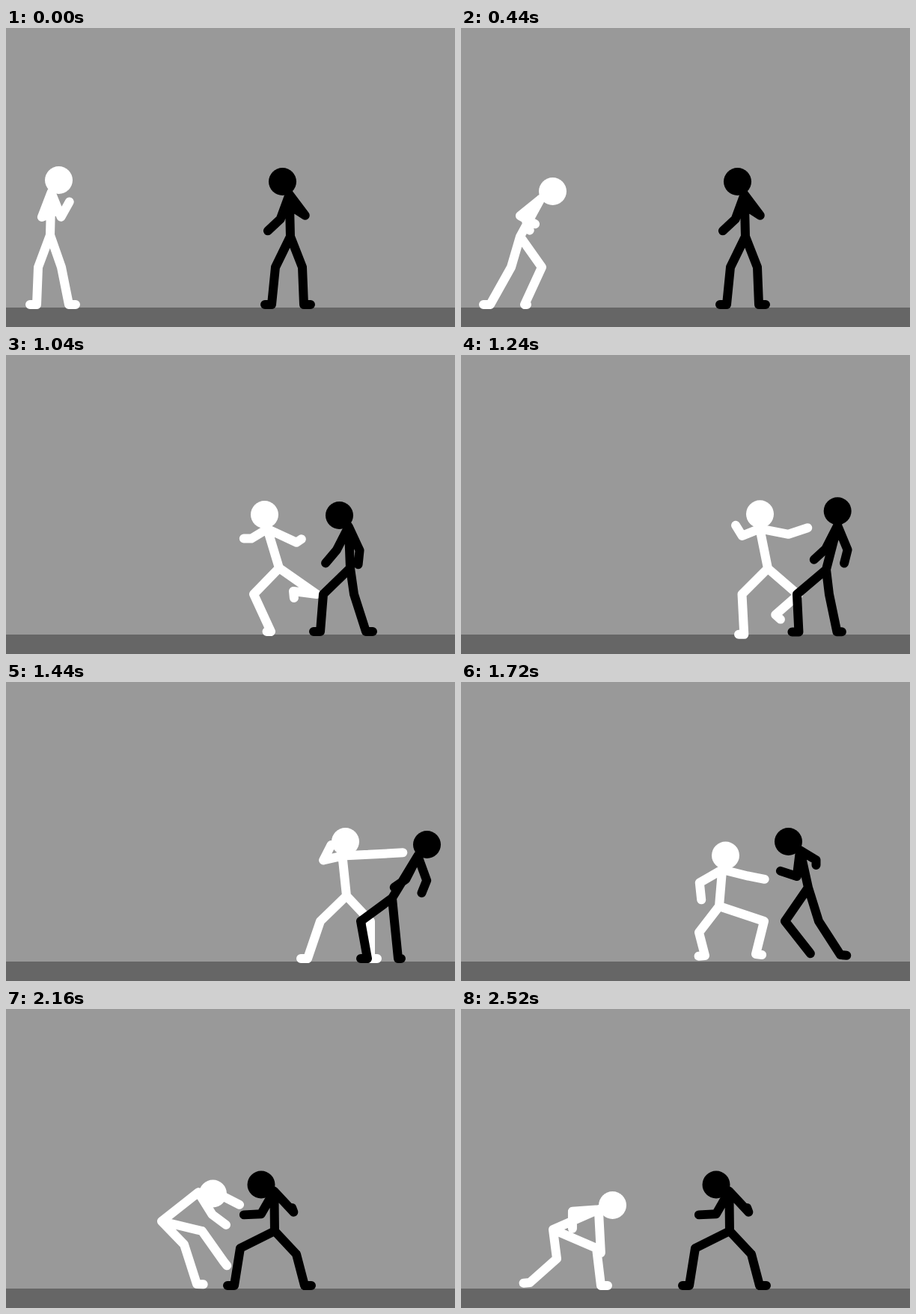
These frames come from a looping animation (600x400 px, 2.88 s). An HTML page:

```html
<!DOCTYPE html>
<html lang="en">
<head>
<meta charset="utf-8">
<title>Stick fight</title>
<style>
  html, body { margin: 0; width: 100%; height: 100%; overflow: hidden; background: #999; }
  svg { display: block; width: 600px; height: 400px; }
  path { fill: none; stroke-width: 12; stroke-linecap: round; stroke-linejoin: round; }
</style>
</head>
<body>
<svg viewBox="0 0 600 400">
  <rect width="600" height="400" fill="#999"/>
  <rect y="374" width="600" height="26" fill="#666"/>
  <g id="white"><path stroke="#fff"/><circle r="18.5" fill="#fff"/></g>
  <g id="black"><path stroke="#000"/><circle r="18.5" fill="#000"/></g>
</svg>
<script>
const LOOP = 2880, STEP = 40;
const NECK = 19.5, UPPER_ARM = 35, FOREARM = 23, TOE = 9;
const KNEE_Y = 320, HEEL_Y = 370;
// Joints: hip, neck, head, two arms (elbow, hand), two legs (knee, heel, toe)
const PARENT = [-1, 0, 1, 1, 3, 1, 5, 0, 7, 8, 0, 10, 11];
const HEAD = 2;

const mix = (a, b, p) => a + (b - a) * p;
const linear = p => p;
const easeOut = p => p * (2 - p);

function polar([x, y], degrees, length) {
  const a = degrees * Math.PI / 180;
  return [x + length * Math.cos(a), y + length * Math.sin(a)];
}

function arm(neck, [upperAngle, foreAngle, fore = FOREARM, upper = UPPER_ARM]) {
  const elbow = polar(neck, upperAngle, upper);
  return [elbow, polar(elbow, foreAngle, fore)];
}

// Knees and heels keep their height unless lifted; toes point away from the hip and droop in the air
function leg(hip, [kneeX, heelX, lift = 0, kneeLift = 0]) {
  const heelY = HEEL_Y - lift;
  const reach = Math.max(-TOE, Math.min(TOE, (heelX - hip[0]) / 2));
  const toe = [heelX + reach * (1 - lift / 60), heelY + lift / 6];
  return [[kneeX, KNEE_Y - kneeLift], [heelX, heelY], toe];
}

// Arms: two angles (and lengths); legs: knee x, heel x (and lifts); front limbs come first
function pose(hip, head, nod, frontArm, backArm, frontLeg, backLeg) {
  const neck = polar(head, nod, -NECK);
  return [hip, neck, head, ...arm(neck, frontArm), ...arm(neck, backArm),
    ...leg(hip, frontLeg), ...leg(hip, backLeg)];
}

// The hip travels; every other joint swings around its parent
function blend(a, b, p) {
  const out = [];
  PARENT.forEach((up, i) => {
    if (up < 0) {
      out.push(a[i].map((n, k) => mix(n, b[i][k], p)));
      return;
    }
    const [ra, rb] = [a, b].map(k => {
      const x = k[i][0] - k[up][0], y = k[i][1] - k[up][1];
      return { len: Math.hypot(x, y), ang: Math.atan2(y, x) * 180 / Math.PI };
    });
    const turn = ((rb.ang - ra.ang + 540) % 360) - 180;
    out.push(polar(out[up], ra.ang + turn * p, mix(ra.len, rb.len, p)));
  });
  return out;
}

const white = {
  guard: pose([59, 277], [70.5, 203.5], -59, [68, -61], [111, -23], [74, 84], [43, 41]),
  windup: pose([79, 279], [122.5, 218.5], -33, [123, 69, 13], [141, 29], [108, 85], [67, 39]),
  jab: pose([243, 284], [297, 224], -36, [-10, -8, 30], [160, 50], [215, 184], [285, 278]),
  run: pose([365, 285], [345.5, 213.5], -101, [25, -34, 8, 43], [149, 180, 10, 25], [415, 384, 54], [331, 354]),
  punch: pose([455, 286], [453.5, 213.5], -78, [-3, -3, 46], [167, -63, 23, 26], [487, 487], [420, 403]),
  retreat: pose([345, 300], [353.5, 232], -77, [14, 11], [150, 84], [405, 394, 6], [318, 326, 4, -15]),
  thrown: pose([208, 284], [276.5, 247], 5, [10, 27], [58, 37], [262, 291, 32, 23], [238, 255, 2, 5]),
  crouch: pose([123, 295], [202.5, 262.5], -17, [87, 87], [176, 90], [181, 187], [128, 92, 4, -14]),
};
white.hit = blend(white.retreat, white.thrown, 0.45);

const black = {
  guard: pose([380, 279], [369.5, 205.5], -118, [110, 137], [53, 213], [360, 355], [396, 398]),
  stagger: pose([460, 285], [445.5, 214.5], -129, [117, 130], [65, 96, 19], [424, 420], [465, 481]),
  reel: pose([516, 289], [562.5, 217.5], -51, [117, 145, 19], [70, 112, 18], [474, 483], [519, 524]),
  charge: pose([464, 275], [437.5, 213.5], -143, [97, 198], [31, 90, 7, 25], [433, 466, 8], [478, 507, 5]),
  low: pose([359, 297], [341, 235], -153, [120, 177], [47, 250, 6, 38], [313, 305], [388, 399, 0, -8]),
};
black.strike = blend(black.charge, black.low, 0.85);

// from, to (ms), easing, poses reached at the end of the move; poses hold in between
const MOVES = [
  [240, 440, easeOut, white.windup, black.guard],
  [520, 760, linear, white.jab, black.guard],
  [840, 1040, linear, white.run, black.stagger],
  [1040, 1440, linear, white.punch, black.reel],
  [1480, 1720, linear, white.retreat, black.charge],
  [1720, 1920, linear, white.hit, black.strike],
  [1960, 2160, linear, white.thrown, black.low],
  [2160, 2520, easeOut, white.crouch, black.low],
];

function draw(id, joints) {
  const [path, head] = document.getElementById(id).children;
  const at = i => joints[i].map(n => n.toFixed(2)).join(" ");
  path.setAttribute("d", PARENT.map((up, i) => up < 0 ? "" : `M${at(up)}L${at(i)}`).join(""));
  head.setAttribute("cx", joints[HEAD][0]);
  head.setAttribute("cy", joints[HEAD][1]);
}

function render(ms) {
  const t = Math.floor((ms % LOOP) / STEP) * STEP;
  let whiteNow = white.guard, blackNow = black.guard;
  for (const [from, to, ease, nextWhite, nextBlack] of MOVES) {
    if (t <= from) break;
    const p = ease(Math.min(1, (t - from) / (to - from)));
    whiteNow = blend(whiteNow, nextWhite, p);
    blackNow = blend(blackNow, nextBlack, p);
  }
  draw("white", whiteNow);
  draw("black", blackNow);
}

const start = performance.now();
function tick() {
  render(performance.now() - start);
  requestAnimationFrame(tick);
}
tick();
</script>
</body>
</html>
```
